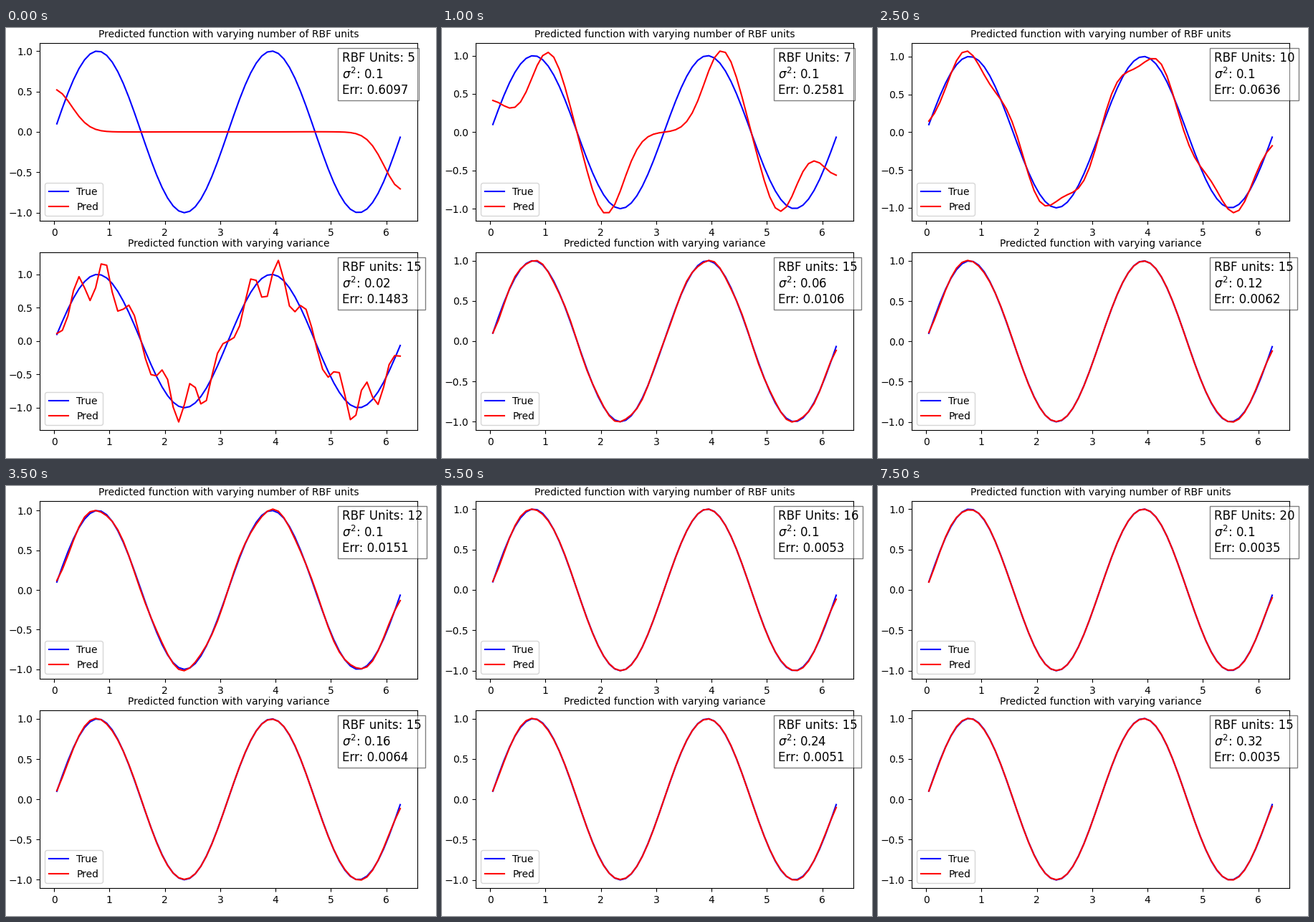
These frames come from a looping animation (600x600 px, 8000 ms). A matplotlib script:

```python
import numpy as np
import matplotlib.pyplot as plt
from matplotlib.animation import FuncAnimation

SIZE = 600
FRAMES = 16

x_train = np.arange(0, 2 * np.pi, 0.1)
x_test = np.arange(0.05, 2 * np.pi, 0.1)


def target(x):
    return np.sin(2 * x)


def features(x, units, var):
    centers = np.linspace(0, 2 * np.pi, units)
    return np.exp(-(x[:, None] - centers) ** 2 / (2 * var))


def predict(units, var):
    """Least-squares RBF fit, evaluated on the test points."""
    weights = np.linalg.lstsq(features(x_train, units, var),
                              target(x_train), rcond=None)[0]
    return features(x_test, units, var) @ weights


class Panel:
    def __init__(self, fig, top, title, label):
        self.label = label
        # 527 x 248 px plot area, `top` px below the upper edge
        self.ax = fig.add_axes([47 / SIZE, (SIZE - top - 248) / SIZE,
                                527 / SIZE, 248 / SIZE])
        self.ax.set_title(title, fontsize=10)
        self.ax.plot(x_test, target(x_test), "b", label="True")
        self.pred, = self.ax.plot(x_test, target(x_test), "r", label="Pred")
        self.ax.legend(loc="lower left")
        self.info = self.ax.text(0.8, 0.95, "", transform=self.ax.transAxes,
                                 fontsize=12, va="top",
                                 bbox=dict(facecolor="white", alpha=0.5))

    def show(self, units, var):
        y = predict(units, var)
        err = np.mean(np.abs(y - target(x_test)))
        self.pred.set_ydata(y)
        self.ax.relim()
        self.ax.autoscale_view()
        self.info.set_text(f"{self.label}: {units}\n"
                           f"$\\sigma^2$: {var:g}\n"
                           f"Err: {err:.4f}")


fig = plt.figure(figsize=(SIZE / 100, SIZE / 100), dpi=100)
by_units = Panel(fig, 21, "Predicted function with varying number of RBF units",
                 "RBF Units")
by_var = Panel(fig, 313, "Predicted function with varying variance",
               "RBF units")


def update(i):
    by_units.show(5 + i, 0.1)
    by_var.show(15, round(0.02 * (i + 1), 2))
    return []


anim = FuncAnimation(fig, update, frames=FRAMES, init_func=lambda: update(0),
                     interval=500, repeat=True, repeat_delay=0, blit=False)
plt.show()
```
